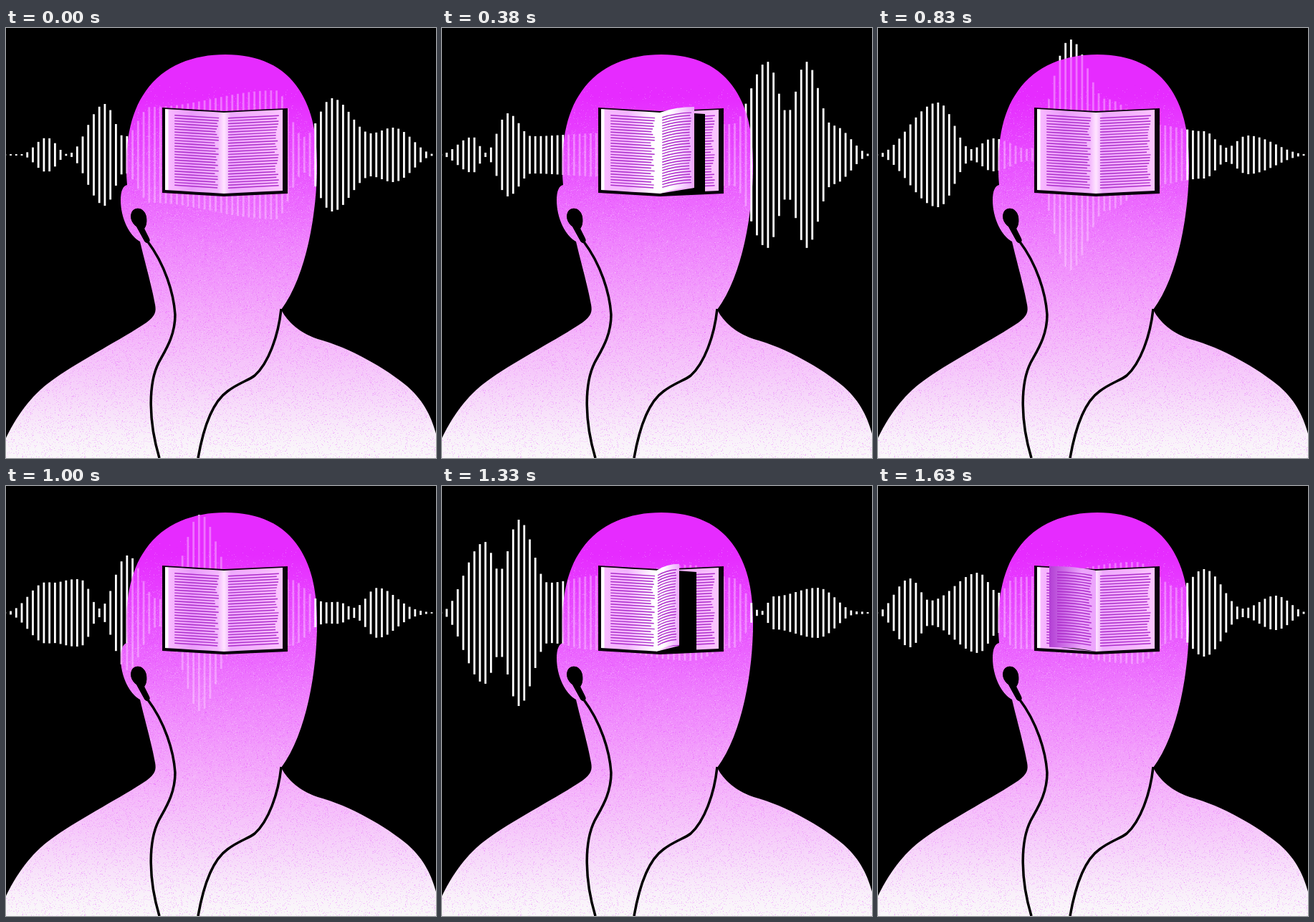
An HTML page with a canvas for the animation above (1.68 s loop, 600 by 600 pixels).

```html
<!DOCTYPE html>
<html>
<head>
<meta charset="utf-8">
<style>
html, body { margin: 0; width: 100%; height: 100%; overflow: hidden; background: #000 }
canvas { display: block }
</style>
</head>
<body>
<canvas id="stage" width="600" height="600"></canvas>
<script>
const g = document.getElementById('stage').getContext('2d');
const LOOP = 1680, STEP = 1000 / 24, FRAMES = 40, GUTTER = 304, MID = 177;

const body = new Path2D(`M0 572C18 535 40 508 68 489C110 460 160 435 196 411C208 402 210 396 208 386
  C204 362 192 320 187 298C172 290 160 265 160 240C160 228 163 220 169 219C165 165 172 120 195 88
  C220 52 262 37 306 37C352 37 388 53 409 86C428 115 434 150 434 192C434 255 420 345 384 393
  C390 405 405 424 435 434C480 446 530 475 560 500C585 522 594 545 600 566V600H0Z`);
const cables = new Path2D(`M197 297C222 330 234 370 236 400C236 430 222 450 213 467C198 497 199 550 214 600
  M384 392C380 430 366 468 347 485C338 492 325 495 309 507C288 522 275 560 268 600`);
const earbud = new Path2D(`M176 256C182 248 194 252 196 264C197 273 195 277 193 280L200 294
  C202 299 197 303 193 297L182 277C175 272 172 263 176 256Z`);
const cover = new Path2D('M218 111L304 116L393 112V231L304 235L218 230Z');

// Wave outlines as x, half-height pairs, each reached at the matching step
const waveSteps = [0, 9, 14, 20, 28, 32, 39, 40];
const waves = [
  [22,1, 57,24, 86,1, 138,71, 165,25, 202,67, 376,90, 416,25, 455,79, 509,30, 540,38],
  [43,25, 61,3, 92,58, 125,26, 215,30, 405,43, 454,130, 482,59, 508,130, 545,41],
  [53,24, 72,10, 112,78, 160,22, 212,10, 260,67, 361,107, 393,114, 428,42, 508,87, 563,11].slice(0),
  [84,73, 130,8, 160,23, 212,8, 268,161, 318,78, 385,42, 455,33, 486,10, 515,27],
  [61,20, 104,87, 130,3, 177,113, 212,50, 400,27, 439,6, 466,17, 486,5, 520,25],
  [60,99, 80,58, 107,130, 148,42, 215,52, 347,67, 405,49, 445,2, 463,23, 524,35, 578,2],
  [45,48, 72,17, 140,56, 168,28, 192,50, 360,71, 420,35, 455,61, 509,6, 555,24]
];

// Page turn: step, free edge, bound edge, end of the shadow
const turn = [[4, 386, 304, 386], [8, 366, 304, 375], [9, 352, 304, 367], [12, 331, 299, 355],
  [14, 281, 290, 321], [19, 239, 304, 304], [20, 226, 304, 304]];

const mix = (a, b, t) => a + (b - a) * t;
const smooth = t => (1 - Math.cos(Math.PI * t)) / 2;

function seeded(seed) {
  return () => (seed = seed * 16807 % 2147483647) / 2147483647;
}

function gradient(ctx, x0, y0, x1, y1, stops) {
  const fill = ctx.createLinearGradient(x0, y0, x1, y1);
  stops.forEach(([at, color]) => fill.addColorStop(at, color));
  return fill;
}

function makeFigure() {
  const layer = document.createElement('canvas');
  layer.width = layer.height = 600;
  const c = layer.getContext('2d'), random = seeded(7);
  c.fillStyle = gradient(c, 0, 0, 0, 600, [[0, '#e62bff'], [.16, '#e62bff'], [.33, '#e955ff'],
    [.5, '#ef83fd'], [.67, '#f4aafb'], [.83, '#f6d0fa'], [.95, '#f9f0fa'], [1, '#faf8fa']]);
  c.fill(body);
  c.globalCompositeOperation = 'source-atop';
  for (let i = 0; i < 70000; i++) {
    const x = random() * 600 | 0, y = random() * 600 | 0;
    if (y < 75 + 110 * random()) continue;
    c.fillStyle = i % 2 ? 'rgba(255,235,255,.22)' : 'rgba(222,30,255,.2)';
    c.fillRect(x, y, 1, 1);
  }
  c.globalCompositeOperation = 'source-over';
  c.lineWidth = 3.5;
  c.stroke(cables);
  c.fillStyle = '#000';
  c.fill(earbud);
  return layer;
}
const figure = makeFigure();

function waveHeight(wave, x) {
  const p = [-2, 1, ...wave, 598, 1];
  let i = 0;
  while (i < p.length - 4 && p[i + 2] < x) i += 2;
  return mix(p[i + 1], p[i + 3], smooth((x - p[i]) / (p[i + 2] - p[i])));
}

function barHeights(step) {
  let k = 0;
  while (waveSteps[k + 1] <= step) k++;
  const t = (step - waveSteps[k]) / (waveSteps[k + 1] - waveSteps[k]);
  const from = waves[k], to = waves[(k + 1) % waves.length];
  return Array.from({ length: 78 }, (_, i) => {
    const x = -1.2 + i * 7.73;
    const swing = 1 + .35 * Math.sin(Math.PI * t) * Math.sin(i * .4 + step * 1.3);
    return { x, h: mix(waveHeight(from, x), waveHeight(to, x), smooth(t)) * swing };
  });
}

function drawBars(bars) {
  for (const { x, h } of bars) g.fillRect(x - 1.4, MID - h, 2.8, h * 2);
}

// A leaf runs from its bound edge to its free edge, raised by lift
function curve(path, from, to, y, lift, bend, back) {
  const cx = mix(from, to, .45), cy = y - lift * bend;
  if (back) {
    path.lineTo(to, y - lift);
    path.quadraticCurveTo(cx, cy, from, y);
  } else {
    path.moveTo(from, y);
    path.quadraticCurveTo(cx, cy, to, y - lift);
  }
}

function leaf(from, to, lift, bend, fill, text = true) {
  const shape = new Path2D(), width = Math.abs(to - from), scale = width / 82;
  curve(shape, from, to, 118, lift, bend);
  curve(shape, from, to, 231, lift, bend, true);
  g.fillStyle = fill;
  g.fill(shape);
  if (!text) return;
  const random = seeded(to < from ? 31 : 57);
  g.save();
  g.clip(shape);
  g.strokeStyle = '#ac2bca';
  g.lineWidth = 1.4;
  for (let i = 0; i < 26; i++) {
    const ragged = random() * 6, y = 126 + i * 3.9;
    const [start, end] = to < from ? [7 + ragged, 69] : [6, 77 - ragged];
    const line = new Path2D();
    curve(line, from, to, y, lift, bend);
    g.setLineDash([0, start * scale, (end - start) * scale, 999]);
    g.stroke(line);
  }
  g.restore();
}

function drawBook(step) {
  g.fillStyle = '#0a000c';
  g.fill(cover);
  const lit = step > 4 && step < 14;
  leaf(GUTTER, 222, 5, .45, gradient(g, 222, 0, GUTTER, 0, [[0, '#fff'], [.05, '#fff'], [.06, '#f8b9ff'],
    [.45, lit ? '#f3b4ff' : '#ea9cfb'], [.9, lit ? '#fff' : '#f3b8fd'], [1, lit ? '#fff' : '#ffe3ff']]));
  leaf(GUTTER, 386, 4, .45, gradient(g, GUTTER, 0, 386, 0,
    [[0, '#ffe6ff'], [.12, '#eeaafd'], [.6, '#f5b4fd'], [1, '#fcc6ff']]));
  if (step > 4) drawTurn(step);
}

function drawTurn(step) {
  let k = 0;
  while (turn[k + 1][0] < step) k++;
  const t = (step - turn[k][0]) / (turn[k + 1][0] - turn[k][0]);
  const [, edge, bound, shadow] = turn[k].map((v, i) => mix(v, turn[k + 1][i], t));
  const lift = 10 - 6 * ((edge - GUTTER) / 82) ** 2;

  g.fillStyle = '#000';
  g.beginPath();
  g.moveTo(bound, 116);
  g.lineTo(shadow, 120);
  g.lineTo(shadow, 232);
  g.lineTo(bound, 231);
  g.lineTo(edge, 223);
  g.fill();

  const shade = Math.max(0, (step - 14) / 5);
  const outer = edge > bound ? '#eda6fd' : `rgb(${mix(255, 178, shade)},${mix(245, 62, shade)},${mix(255, 212, shade)})`;
  const inner = edge > bound ? '#fff' : `rgb(${mix(255, 236, shade)},${mix(245, 165, shade)},${mix(255, 252, shade)})`;
  const fill = gradient(g, bound, 0, edge, 0, [[0, inner], [.3, inner], [1, outer]]);
  leaf(bound, edge, lift, 1, fill, Math.abs(edge - bound) > 20);
}

function draw(step) {
  const bars = barHeights(step);
  g.fillStyle = '#000';
  g.fillRect(0, 0, 600, 600);
  g.fillStyle = '#fff';
  drawBars(bars);
  g.drawImage(figure, 0, 0);

  g.save();
  g.clip(body);
  g.fillStyle = 'rgba(255,225,255,.38)';
  drawBars(bars.filter(b => b.x < 430));
  g.restore();
  g.fillStyle = '#fff';
  drawBars(bars.filter(b => b.x > 430 && b.x < 434));
  g.fillStyle = '#000';
  g.fill(earbud);

  drawBook(step % 20);
}

function tick() {
  const t = Math.floor(performance.now() % LOOP / 10) * 10;
  draw(Math.min(FRAMES - 1, Math.floor((t + 4.9) / STEP)));
  requestAnimationFrame(tick);
}
tick();
</script>
</body>
</html>
```
